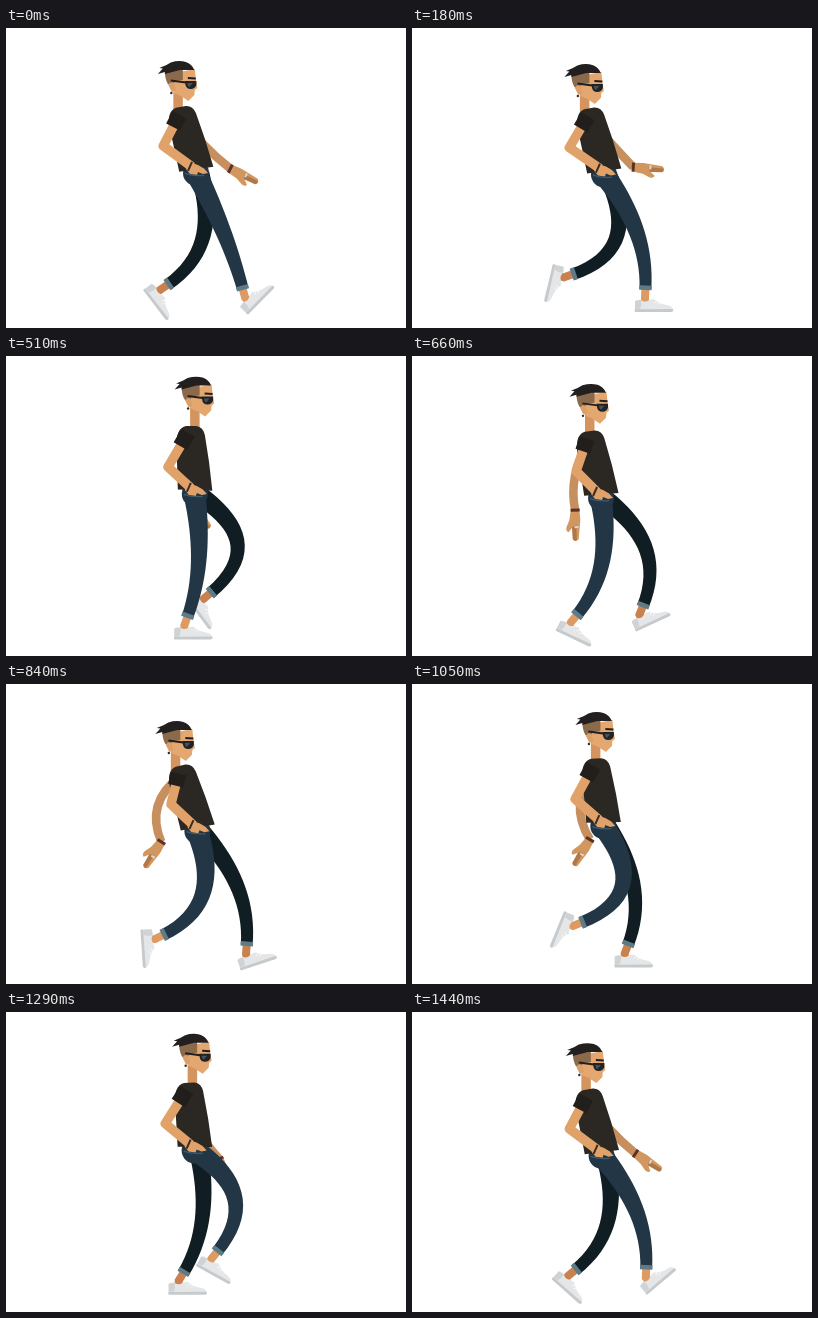
Write an HTML page that moves like this. It is 400x300 px and loops after 1470 ms.

```html
<!DOCTYPE html>
<html lang="en">
<head>
<meta charset="utf-8">
<title>Walk cycle</title>
<style>
html, body { margin: 0; width: 100%; height: 100%; overflow: hidden; background: #fff; }
svg { display: block; width: 100vw; height: 100vh; }
</style>
</head>
<body>
<svg viewBox="0 0 400 300">
  <defs>
    <g id="shoe">
      <path fill="#e4e6e7" d="M-10 3Q-7 1-4 2Q0 5 4 2L9 1Q14 6 22 7Q28 8 28 12.500L-10 13Z"/>
      <path fill="#cfd3d5" d="M-10 3L-4 2Q-3 7-5 11L-10 11Z"/>
      <path fill="#c6cacc" d="M-10.500 11.300L28 11Q29 14 26 14L-10 14Z"/>
      <path fill="none" stroke="#f7f8f8" d="M9 5l3-2M12 6.500l3-2"/>
    </g>
    <rect id="cuff" x="-6.200" y="-3.500" width="12.400" height="4.500" fill="#5e7c88"/>
  </defs>
  <path id="farArm" fill="none" stroke="#c78e5e" stroke-width="8.500"/>
  <g id="farHand">
    <path fill="#d2965f" d="M-1-4.200L10-5L29-3Q32-1 29 2L17 3L22 7Q21 10 17 9L10 6L4 5L-1 4.200Z"/>
    <path fill="#b17748" d="M15-1L30-1Q32 1 29 3L17 3.500Z"/>
    <path stroke="#5a3226" stroke-width="3" d="M0-4.500V4.500"/>
    <path stroke="#d5d8da" stroke-width="2" d="M17-3V1"/>
  </g>
  <g id="farLeg">
    <path class="ankle" stroke="#c9824f" stroke-width="8"/>
    <use class="foot" href="#shoe"/>
    <path class="limb" fill="#101d23"/>
    <use class="hem" href="#cuff"/>
  </g>
  <g id="nearLeg">
    <path class="ankle" stroke="#dd9a62" stroke-width="8"/>
    <use class="foot" href="#shoe"/>
    <path class="limb" fill="#233646"/>
    <use class="hem" href="#cuff"/>
  </g>
  <circle id="hip" cx="-1" cy="4" r="13" fill="#233646"/>
  <g id="head">
    <path fill="#d3945f" d="M169.500 57H179V84H169.500Z"/>
    <path fill="#e3a76f" d="M170 45L191 41L192 51L193.500 60L191 62L190.500 67L184.500 73L177 68L170 65Z"/>
    <path fill="#8b6a4c" d="M161 43L179 41V52L171 53L169 59L164 56Q161 51 161 43Z"/>
    <path fill="#241f1f" d="M154 46L159 40.500L155.500 40Q163 37 167 34.500Q175 32 182 34Q188 36 190.500 42L176 42L161 46L161 44Z"/>
    <path fill="#dba069" d="M164.500 57Q166 53 170 55L172 62L168 64Z"/>
    <circle cx="167.500" cy="65" r="1.200" fill="#332b28"/>
    <path fill="none" stroke="#241f1f" stroke-width="2" d="M167 52.500L182 54.500M184 50L192 50.500"/>
    <path fill="#1f2226" d="M181 53H192.500V57Q191 61 187 61Q182 61 181.500 56Z"/>
    <path fill="#46525b" d="M183.500 55H189L185.500 59Q183.500 58 183.500 55Z"/>
  </g>
  <path id="shirt" fill="#2b2823" d="M-19-42Q-20-62-9-64H1Q8-63 9.500-55Q14-28 16.500 1L-18-.500L-18.500-25Z"/>
  <path id="nearArm" fill="none" stroke="#e1a26a" stroke-width="9.500" stroke-linejoin="round"/>
  <path id="sleeve" stroke="#211e1b" stroke-width="15.500"/>
  <g id="pocket">
    <path fill="#e1a26a" d="M-8-7L1-4L7-.500L11 4L6 5L1 3L0 6L-7 5L-11 0Z"/>
    <path fill="none" stroke="#3f5c70" stroke-width="1.300" d="M-12 4.500Q-4 7.500 7 6.500"/>
    <path stroke="#3c2b25" stroke-width="2" d="M-9 2L-5-7"/>
  </g>
</svg>
<script>
const LOOP = 1470, STEP = 30, RAD = Math.PI / 180;
const LEG = 126, HEM_WIDTH = 11.8, GROUND = 261;
const $ = id => document.getElementById(id);
const set = (el, name, value) => el.setAttribute(name, value);
const place = (x, y, angle = 0) => `translate(${x} ${y}) rotate(${angle})`;
const wave = deg => Math.cos(deg * RAD);
const smooth = s => s * s * (3 - 2 * s);
const lerp = (a, b, f) => a.map((v, i) => v + (b[i] - v) * f);

function spin(x, y, deg) {
  const c = wave(deg), s = Math.sin(deg * RAD);
  return [x * c - y * s, x * s + y * c];
}

// Two bobs per stride; a stride is 360 degrees.
function bodyPose(deg) {
  const sway = wave(2 * deg - 222), rise = wave(2 * deg - 239);
  return {
    sway,
    head: [5.5 + 10.3 * sway, -4.3 - 8.3 * rise],
    waist: [191.3 + 1.7 * wave(2 * deg - 100), 138.5 - 4.7 * rise],
    lean: -6.2 + 6.4 * sway
  };
}

// Swing lifts the foot late, then drops it sharply onto the heel.
function hemPoint(deg) {
  const swing = Math.max(0, (deg - 140) / 220);
  return [
    194.5 + 41 * wave(deg - 20) + 4 * wave(2 * deg - 20),
    GROUND - 25.5 * Math.sin(Math.PI * swing ** 1.7)
  ];
}

// Roll onto the toe, swing through toe up, slap down flat.
function footAngle(deg) {
  const toeOff = 113, strike = -46;
  const d = deg < 42 ? deg + 360 : deg;
  if (d < 140) return 0;
  if (d < 250) return toeOff * Math.sin((d - 140) / 110 * Math.PI / 2) ** 1.25;
  if (d < 364) return toeOff + (strike - toeOff) * smooth(((d - 250) / 114) ** 1.2);
  return strike * (1 - smooth((d - 364) / 38));
}

// Tapered outline around a cubic from hip to hem.
function limb(p, top) {
  const left = [], right = [], N = 18;
  const mix = (k, w) => w.reduce((sum, f, j) => sum + f * p[j][k], 0);
  for (let j = 0; j <= N; j++) {
    const u = j / N, v = 1 - u;
    const pos = [v * v * v, 3 * v * v * u, 3 * v * u * u, u * u * u];
    const der = [-v * v, v * v - 2 * v * u, 2 * v * u - u * u, u * u];
    const x = mix(0, pos), y = mix(1, pos);
    const dx = mix(0, der), dy = mix(1, der);
    const w = (HEM_WIDTH + (top - HEM_WIDTH) * v ** 1.3) / 2 / Math.hypot(dx, dy);
    left.push([x + dy * w, y - dx * w]);
    right.unshift([x - dy * w, y + dx * w]);
  }
  return 'M' + left.concat(right).map(q => q.map(n => n.toFixed(2)).join(' ')).join('L') + 'Z';
}

function drawLeg(id, deg, hip, top, shift) {
  const part = name => $(id).querySelector('.' + name);
  const [px, y] = hemPoint(deg), x = px + shift;
  const dx = x - hip[0], dy = y - hip[1], reach = Math.hypot(dx, dy);

  // The leg keeps its length, so a shorter reach bows it forward.
  const bow = 9.5 * Math.sqrt(Math.max(0.3, LEG - reach));
  const bend = (f, amount) => {
    const [cx, cy] = lerp(hip, [x, y], f);
    return [cx + dy / reach * bow * amount, cy - dx / reach * bow * amount];
  };
  const knee = bend(1 / 3, 0.75), shin = bend(2 / 3, 1);
  const dir = Math.atan2(y - shin[1], x - shin[0]), foot = footAngle(deg);
  const fx = x + 9 * Math.cos(dir), fy = y + 9 * Math.sin(dir);
  const [hx, hy] = spin(0, 5, foot);

  set(part('limb'), 'd', limb([hip, knee, shin, [x, y]], top));
  set(part('hem'), 'transform', place(x, y, dir / RAD - 90));
  set(part('ankle'), 'd', `M${x} ${y}L${fx} ${fy}L${fx + hx} ${fy + hy}`);
  set(part('foot'), 'transform', place(fx, fy, foot));
}

function drawArms(deg, { waist: [wx, wy], lean, sway }) {
  const shoulder = x => {
    const [dx, dy] = spin(x, -54, lean);
    return [wx + dx, wy + dy];
  };
  const top = shoulder(-9), elbow = [161 - 4 * wave(deg - 20), wy - 23];
  const at = f => lerp(top, elbow, f).join(' ');
  set($('nearArm'), 'd', `M${at(0)}L${at(1)}L${wx - 5} ${wy - 2}`);
  set($('sleeve'), 'd', `M${at(-0.1)}L${at(0.33)}`);

  const hand = [193 + 35 * wave(deg - 15) + 3.3 * sway, 148.5 - 9.5 * wave(deg - 35)];
  const bend = [176 + 31 * wave(deg - 35) + 7 * sway, 119];
  set($('farArm'), 'd', `M${shoulder(-6).join(' ')}Q${bend.join(' ')} ${hand.join(' ')}`);
  set($('farHand'), 'transform', place(...hand, 66 - 62 * wave(deg - 50)));
}

function draw(t) {
  const deg = t / LOOP * 360, body = bodyPose(deg);
  const [wx, wy] = body.waist;
  drawLeg('farLeg', (deg + 180) % 360, [wx + 3, wy + 5], 19, 2);
  drawLeg('nearLeg', deg, [wx - 1.5, wy + 3], 22, 0);
  drawArms(deg, body);
  set($('head'), 'transform', place(...body.head));
  set($('shirt'), 'transform', place(wx, wy, body.lean));
  for (const id of ['hip', 'pocket']) set($(id), 'transform', place(wx, wy));
}

const start = performance.now();
function tick() {
  const t = (performance.now() - start) % LOOP;
  draw(Math.floor(t / STEP) * STEP);
  requestAnimationFrame(tick);
}
tick();
</script>
</body>
</html>
```
